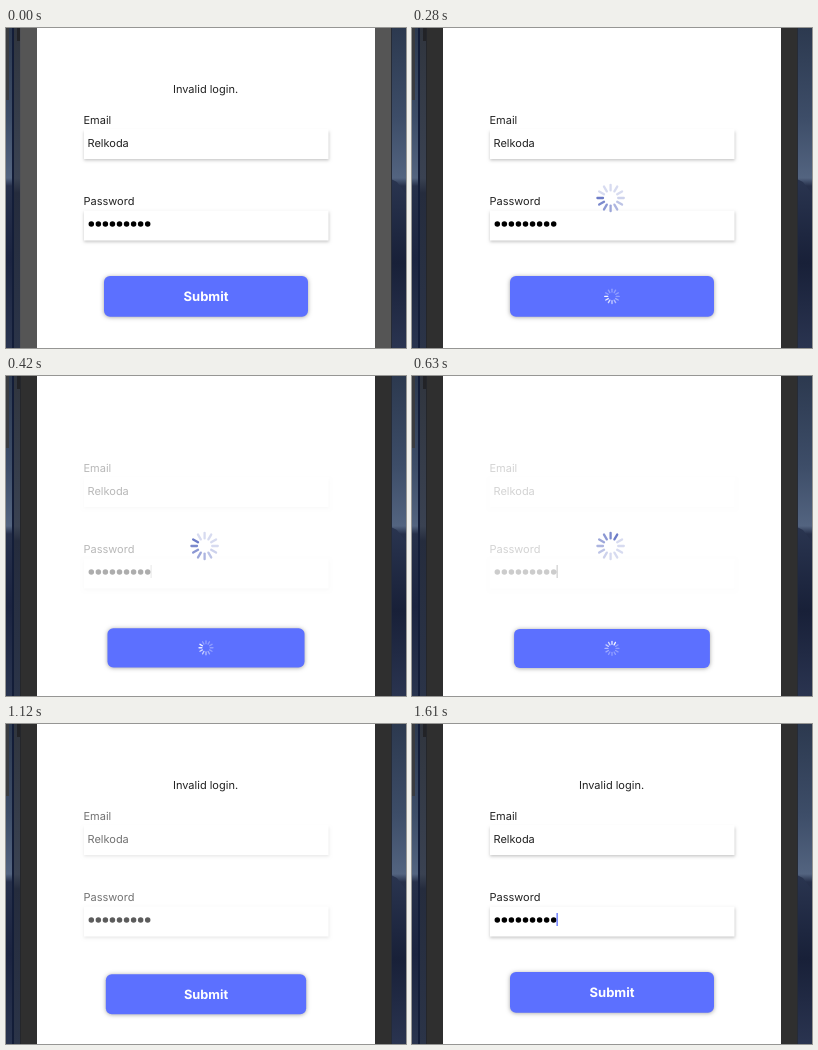
An HTML page with a canvas that plays this animation: 400 by 320 pixels, repeating every 1680 ms.

```html
<!DOCTYPE html>
<html lang="en">
<head>
<meta charset="utf-8">
<title>Login form</title>
<style>
  html, body { margin: 0; width: 100%; height: 100%; overflow: hidden; }
  canvas { display: block; }
</style>
</head>
<body>
<canvas id="stage" width="400" height="320"></canvas>
<script>
const ctx = document.getElementById('stage').getContext('2d');
const LOOP = 1680, STEP = 70;
const LOAD = 210, FADE = 280, FAIL = 1050, EASE = 300;
const INK = '#222', BLUE = '#5c70ff';

ctx.textRendering = 'geometricPrecision';

const clamp = x => Math.min(1, Math.max(0, x));
const ramp = (t, from, to) => clamp((t - from) / (to - from));
const easeOut = x => 1 - (1 - x) ** 3;

function rect(x, y, w, h, fill) {
  ctx.fillStyle = fill;
  ctx.fillRect(x, y, w, h);
}

function text(str, x, y, fill = INK, font = '11px', align = 'left') {
  ctx.font = font + ' Inter, "Liberation Sans", sans-serif';
  ctx.textAlign = align;
  ctx.fillStyle = fill;
  ctx.fillText(str, x, y);
}

function withShadow(alpha, blur, offset, draw) {
  ctx.save();
  ctx.shadowColor = `rgba(0,0,0,${alpha})`;
  ctx.shadowBlur = blur;
  ctx.shadowOffsetY = offset;
  draw();
  ctx.restore();
}

function gradient(...stops) {
  const g = ctx.createLinearGradient(0, 0, 0, 320);
  for (const [at, color] of stops) g.addColorStop(at / 320, color);
  return g;
}

function backdrop(t) {
  const focused = t >= STEP;
  // wallpaper: dusk sky above dark hills
  rect(0, 0, 400, 320, gradient([0, '#2c394f'], [90, '#3d4d68'], [150, '#536480'],
    [158, '#26304a'], [230, '#1b2440'], [320, '#29344f']));
  ctx.fillStyle = gradient([150, '#2a3550'], [235, '#182038'], [320, '#2a3450']);
  ctx.beginPath();
  ctx.moveTo(385, 151);
  ctx.lineTo(391, 154);
  ctx.lineTo(400, 166);
  ctx.lineTo(400, 320);
  ctx.lineTo(385, 320);
  ctx.fill();
  // window edge on the left
  rect(0, 0, 3, 72, '#3a3c40');
  rect(6, 0, 2, 320, '#131d38');
  rect(8, 0, 7, 320, gradient([0, '#30353e'], [150, '#3a4252'], [165, '#252c3d'], [320, '#2b3448']));
  rect(11, 0, 4, 13, '#222327');
  rect(14, 0, 1, 320, focused ? '#24262b' : '#505155');
  rect(15, 0, 370, 320, focused ? '#2f2f2f' : '#555');
  rect(385, 0, 1, 320, '#262b36');
  rect(31, 0, 338, 320, '#fff');
}

function spinner(t, x, y, inner, outer, width, color, low) {
  const head = Math.floor(t * 12 / 1000 + 5.7);
  ctx.save();
  ctx.translate(x, y);
  ctx.strokeStyle = color;
  ctx.lineWidth = width;
  ctx.lineCap = 'round';
  for (let i = 0; i < 12; i++) {
    ctx.save();
    ctx.rotate((head - i) * Math.PI / 6);
    ctx.globalAlpha = Math.max(low, 0.95 - i * 0.105);
    ctx.beginPath();
    ctx.moveTo(0, -inner);
    ctx.lineTo(0, -outer);
    ctx.stroke();
    ctx.restore();
  }
  ctx.restore();
}

function form(t, opacity) {
  for (const y of [101, 182.5])
    withShadow(0.22 * opacity ** 2, 3, 1.5, () => rect(78, y, 244.5, 30, '#fff'));
  ctx.save();
  ctx.globalAlpha = opacity;
  text('Email', 77.5, 96);
  text('Relkoda', 81.5, 118.7);
  text('Password', 77.5, 177.3);
  ctx.fillStyle = '#000';
  for (let i = 0; i < 9; i++) {
    ctx.beginPath();
    ctx.arc(85.3 + i * 7.05, 196, 2.75, 0, 7);
    ctx.fill();
  }
  const blink = t < 1200 ? ramp(t, 370, 560) * (1 - ramp(t, 900, 1060)) : ramp(t, 1400, 1550);
  ctx.globalAlpha = opacity * blink;
  rect(144.5, 189, 1.3, 13, opacity < 0.5 ? INK : BLUE);
  ctx.restore();
}

function button(t, press, loading) {
  ctx.save();
  ctx.translate(200, 268.4 + 4 * press);
  ctx.scale(1 - 0.04 * press, 1 - 0.04 * press);
  withShadow(0.36, 4, 0.6, () => {
    ctx.fillStyle = BLUE;
    ctx.beginPath();
    ctx.roundRect(-102, -20.3, 204, 40.6, 6);
    ctx.fill();
  });
  if (loading) spinner(t, 0, 0, 4.3, 7.2, 1.4, '#fff', 0.32);
  else text('Submit', 0, 4.6, '#fff', '700 13px', 'center');
  ctx.restore();
}

function draw(now) {
  const t = Math.floor(now % LOOP / STEP) * STEP;
  const loading = t >= LOAD && t < FAIL;
  const press = easeOut(ramp(t, FADE, FADE + EASE)) - easeOut(ramp(t, FAIL, FAIL + EASE));
  backdrop(t);
  form(t, 1 - 0.8 * press);
  button(t, press, loading);
  if (loading) spinner(t, 198.6, 170, 7.6, 13.2, 2.3, '#6474c4', 0.26);
  else text('Invalid login.', 199.5, 65, INK, '11px', 'center');
}

const start = performance.now();
function tick() {
  draw(performance.now() - start);
  requestAnimationFrame(tick);
}
tick();
</script>
</body>
</html>
```
